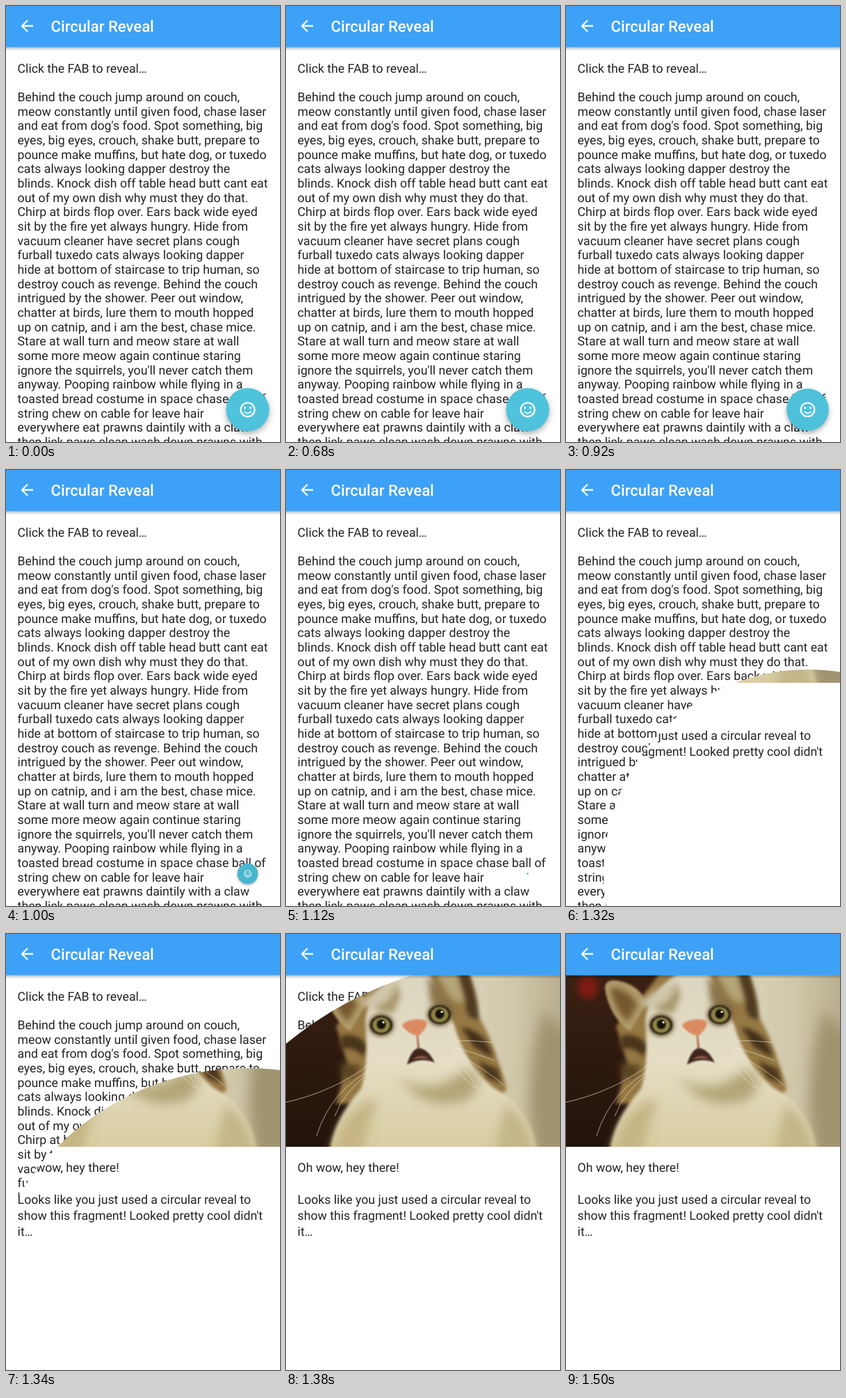
An HTML page with a canvas for the animation above (3.02 s loop, 394 by 627 pixels).

```html
<!DOCTYPE html>
<html lang="en">
<head>
<meta charset="utf-8">
<title>Circular Reveal</title>
<style>
html, body { margin: 0; width: 100%; height: 100%; overflow: hidden; background: #fff; }
canvas { display: block; width: 394px; height: 627px; }
</style>
</head>
<body>
<canvas id="stage" width="394" height="627"></canvas>
<script>
const W = 394, H = 627, LOOP = 3020, STEP = 20, BAR = 59.5, PHOTO_END = 306;
const FAB = { x: 347.5, y: 580.5, r: 31 };
const HIDE = { start: 892, length: 300 };
const REVEAL = { start: 1220.5, length: 207, radius: 625 };
const BODY_FONT = '17.69px Roboto, sans-serif';
const INK = '#232323';

const article = `Click the FAB to reveal…

Behind the couch jump around on couch,
meow constantly until given food, chase laser
and eat from dog's food. Spot something, big
eyes, big eyes, crouch, shake butt, prepare to
pounce make muffins, but hate dog, or tuxedo
cats always looking dapper destroy the
blinds. Knock dish off table head butt cant eat
out of my own dish why must they do that.
Chirp at birds flop over. Ears back wide eyed
sit by the fire yet always hungry. Hide from
vacuum cleaner have secret plans cough
furball tuxedo cats always looking dapper
hide at bottom of staircase to trip human, so
destroy couch as revenge. Behind the couch
intrigued by the shower. Peer out window,
chatter at birds, lure them to mouth hopped
up on catnip, and i am the best, chase mice.
Stare at wall turn and meow stare at wall
some more meow again continue staring
ignore the squirrels, you'll never catch them
anyway. Pooping rainbow while flying in a
toasted bread costume in space chase ball of
string chew on cable for leave hair
everywhere eat prawns daintily with a claw
then lick paws clean wash down prawns with`.split('\n');

const message = `Oh wow, hey there!

Looks like you just used a circular reveal to
show this fragment! Looked pretty cool didn't
it…`.split('\n');

const clamp = v => Math.max(0, Math.min(1, v));

// Cubic curve (.4, 0, .2, 1), solved by bisection.
function fastOutSlowIn(x) {
  let lo = 0, hi = 1;
  for (let i = 0; i < 24; i++) {
    const s = (lo + hi) / 2, q = 1 - s;
    if (1.2 * s * q * q + 0.6 * s * s * q + s ** 3 < x) lo = s; else hi = s;
  }
  return 3 * lo * lo * (1 - lo) + lo ** 3;
}

const accelDecel = t => (1 - Math.cos(Math.PI * t)) / 2;

function newLayer() {
  const canvas = document.createElement('canvas');
  canvas.width = W;
  canvas.height = H;
  return canvas.getContext('2d');
}

function lines(c, rows, baseline, pitch) {
  c.font = BODY_FONT;
  c.textRendering = 'geometricPrecision';
  c.fillStyle = INK;
  rows.forEach((row, i) => c.fillText(row, 16.6, baseline + i * pitch));
}

function shape(c, path, color, blur = 0) {
  c.filter = blur ? `blur(${blur}px)` : 'none';
  c.fillStyle = color;
  c.fill(path instanceof Path2D ? path : new Path2D(path));
  c.filter = 'none';
}

function oval(c, x, y, rx, ry, color, blur) {
  const p = new Path2D();
  p.ellipse(x, y, rx, ry, 0, 0, 2 * Math.PI);
  shape(c, p, color, blur);
}

function fade(c, x0, y0, x1, y1, ...colors) {
  const g = c.createLinearGradient(x0, y0, x1, y1);
  colors.forEach((color, i) => g.addColorStop(i / (colors.length - 1), color));
  return g;
}

function eye(c, x, y) {
  oval(c, x, y, 18, 16, '#6a5634', 3);
  oval(c, x, y, 16, 13.5, '#2a2013', 1);
  oval(c, x, y, 12.5, 11, '#928847', 1);
  oval(c, x, y - 1, 6.5, 7, '#15110b', 1);
  oval(c, x + 3, y - 4, 1.8, 1.5, '#e8e6d5', 0.5);
}

function photo(c) {
  c.save();
  c.beginPath();
  c.rect(0, 59, W, PHOTO_END - 59);
  c.clip();

  c.fillStyle = fade(c, 0, 59, 0, PHOTO_END, '#3a2012', '#21130b');
  c.fillRect(0, 59, W, H);
  oval(c, 32, 77, 15, 17, '#7d1c14', 5);

  shape(c, 'M262 50H410V320H330L270 130Z', fade(c, 265, 0, W, 0, '#d9d2b8', '#d0c7aa', '#b9ae90'), 2);
  shape(c, 'M372 110C350 170 346 240 358 320H410V150Z', '#a0946f', 9);

  // Tabby head with ears
  shape(c, 'M72 132L108 92L140 50H258C272 76 274 104 276 118C294 144 304 180 318 222L300 244H72L88 186Z', '#967843', 2.5);
  shape(c, 'M56 78C56 64 72 65 88 71C104 78 112 88 116 100L92 140C74 128 60 106 56 78Z', '#b09a68', 1.5);
  shape(c, 'M64 78C78 76 95 87 102 102L89 126C76 114 67 98 64 78Z', '#76572f', 4);
  shape(c, 'M244 50H258C272 76 276 104 277 124L262 118Z', '#4e3a20', 3);
  shape(c, 'M212 50H244L258 100L236 94Z', '#b4a479', 4);
  shape(c, 'M80 146C98 142 112 152 118 162L112 176C98 164 88 162 77 166Z', '#49351b', 3);
  shape(c, 'M78 184L108 190L100 206L80 212Z', '#594321', 4);
  shape(c, 'M252 134C276 138 292 152 297 178L270 162Z', '#44311a', 3);
  shape(c, 'M276 182L304 194L310 214L290 208Z', '#4c371b', 3);

  // White face and chest
  shape(c, 'M114 126C116 100 138 70 168 52H206C214 84 238 112 246 144C258 176 276 204 300 222C338 242 356 276 362 320H62C66 276 88 246 108 222C118 190 116 150 114 126Z',
    fade(c, 0, 59, 0, PHOTO_END, '#dcd6c0', '#e5dec5', '#d8cda2'), 2);
  shape(c, 'M108 98C122 84 140 74 160 64L152 92L122 110Z', '#cfc5a8', 4);
  shape(c, 'M126 108L150 92L160 70L164 92L154 114Z', '#a8966c', 4);
  shape(c, 'M204 60L222 74L244 112L208 100Z', '#8a744a', 5);
  shape(c, 'M164 204C190 228 228 222 258 194C282 202 282 222 262 238C226 250 186 246 164 204Z', '#b3a577', 8);
  shape(c, 'M66 316C76 266 106 240 132 236L108 316Z', '#c5b584', 8);
  shape(c, 'M300 316L314 246C342 258 354 284 358 316Z', '#c4b68b', 8);

  eye(c, 137, 131);
  eye(c, 221, 116);
  shape(c, 'M167 131C172 123 196 120 202 126C204 133 197 141 190 147C181 145 171 139 167 131Z', '#dc8a62', 1.2);
  shape(c, 'M188 146L190 146L192 165L189 165Z', '#a85f45', 0.8);
  shape(c, 'M174 188C178 173 184 165 191 164C201 165 208 173 214 185C204 180 187 180 174 188Z', '#3e261c', 1);
  shape(c, 'M182 181C190 174 199 174 206 180C198 178 191 178 182 181Z', '#a36655', 0.8);

  c.strokeStyle = 'rgba(239,232,211,.7)';
  c.lineWidth = 0.9;
  c.stroke(new Path2D('M122 186Q70 226 0 242M126 194Q66 222 44 290M118 200Q82 230 70 262M236 154Q266 152 298 156M238 162Q270 170 300 182M240 170Q282 190 319 222M238 176Q262 198 278 226M234 180Q250 206 274 222'));
  c.restore();
}

const page = newLayer();
page.fillStyle = '#fff';
page.fillRect(0, 0, W, H);
lines(page, article, 95.7, 20.66);

const fragment = newLayer();
fragment.fillStyle = '#fff';
fragment.fillRect(0, 0, W, H);
photo(fragment);
lines(fragment, message, 342.4, 22.95);

const ctx = document.getElementById('stage').getContext('2d');
const arrow = new Path2D('M20 11H7.83l5.59-5.59L12 4l-8 8 8 8 1.41-1.41L7.83 13H20z');
const smile = new Path2D('M12 16c-1.48 0-2.75-.81-3.45-2H6.88c.8 2.05 2.79 3.5 5.12 3.5s4.32-1.45 5.12-3.5h-1.67c-.7 1.19-1.97 2-3.45 2z');

function disc(x, y, r) {
  ctx.beginPath();
  ctx.arc(x, y, r, 0, 2 * Math.PI);
}

function drawBar() {
  ctx.fillStyle = fade(ctx, 0, BAR, 0, BAR + 5, 'rgba(0,0,0,.24)', 'rgba(0,0,0,0)');
  ctx.fillRect(0, BAR, W, 5);
  ctx.fillStyle = '#3da1f7';
  ctx.fillRect(0, 0, W, BAR);

  ctx.fillStyle = '#fff';
  ctx.save();
  ctx.translate(16.9, 15.4);
  ctx.scale(1.11, 1.11);
  ctx.fill(arrow);
  ctx.restore();
  ctx.font = '500 22.1px Roboto, sans-serif';
  ctx.textRendering = 'geometricPrecision';
  ctx.fillText('Circular Reveal', 64.6, 37);
}

function drawFab(scale, press) {
  if (scale < 0.005) return;
  const mix = (a, b) => Math.round(a + (b - a) * press);
  ctx.save();
  ctx.translate(FAB.x, FAB.y);
  ctx.scale(scale, scale);
  ctx.save();
  ctx.shadowColor = 'rgba(0,0,0,.32)';
  ctx.shadowBlur = 8 * scale;
  ctx.shadowOffsetY = 3.5 * scale;
  ctx.fillStyle = `rgb(${mix(80, 72)},${mix(195, 183)},${mix(220, 206)})`;
  disc(0, 0, FAB.r);
  ctx.fill();
  ctx.restore();

  ctx.scale(1.11, 1.11);
  ctx.translate(-12, -12);
  ctx.fillStyle = ctx.strokeStyle = '#fff';
  ctx.lineWidth = 2;
  disc(12, 12, 9);
  ctx.stroke();
  for (const x of [8.5, 15.5]) {
    disc(x, 9.5, 1.5);
    ctx.fill();
  }
  ctx.fill(smile);
  ctx.restore();
}

function draw(t) {
  ctx.drawImage(page.canvas, 0, 0);
  drawFab(1 - fastOutSlowIn(clamp((t - HIDE.start) / HIDE.length)), clamp((t - 900) / 80));

  const shown = accelDecel(clamp((t - REVEAL.start) / REVEAL.length));
  if (shown > 0) {
    ctx.save();
    if (shown < 1) {
      disc(FAB.x, FAB.y, shown * REVEAL.radius);
      ctx.clip();
    }
    ctx.drawImage(fragment.canvas, 0, 0);
    ctx.restore();
  }
  drawBar();
}

// The picture advances at 50 steps per second.
const begin = performance.now();
function tick() {
  const t = (performance.now() - begin) % LOOP;
  draw(Math.floor((t + 3) / STEP) * STEP);
  requestAnimationFrame(tick);
}
tick();
</script>
</body>
</html>
```
